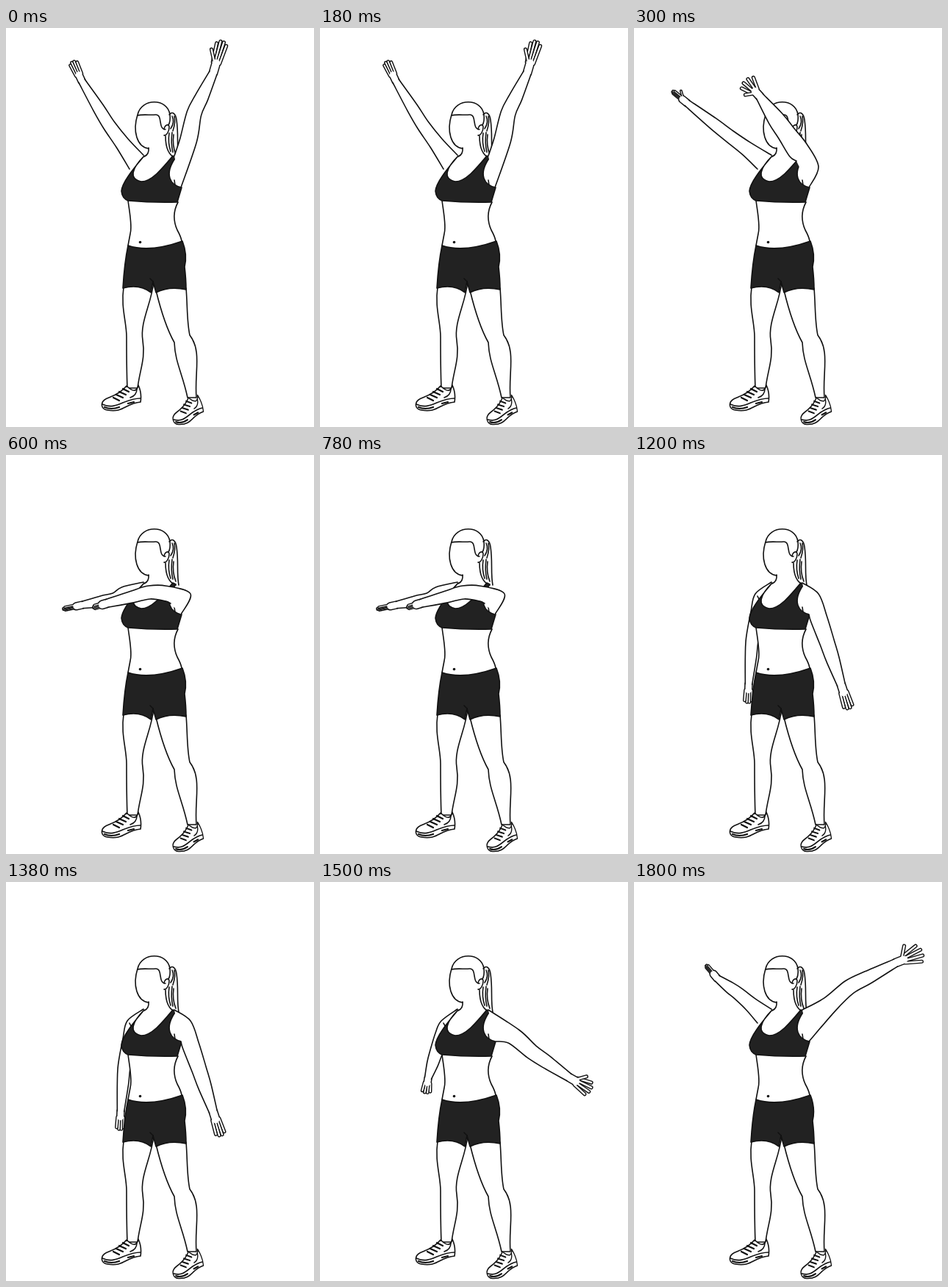
An HTML page for the animation above (2.1 s loop, 419 by 543 pixels).

```html
<!DOCTYPE html>
<html lang="en">
<head>
<meta charset="utf-8">
<title>Arm circles</title>
<style>
html, body { margin: 0; width: 100%; height: 100%; overflow: hidden; background: #fff; }
svg { display: block; width: 419px; height: 543px; }
path { fill: none; stroke: #111; stroke-width: 1.6; stroke-linecap: round; stroke-linejoin: round; }
.skin { fill: #fff; }
.bare { fill: #fff; stroke: none; }
.cloth { fill: #222; }
.bold { stroke-width: 2.2; }
.pose { visibility: hidden; animation: show 2100ms step-end calc(var(--i) * 300ms - 2100ms) infinite; }
@keyframes show {
  0% { visibility: visible; }
  14.28571%, 100% { visibility: hidden; }
}
</style>
</head>
<body>
<svg viewBox="0 0 419 543">
  <defs>
    <g id="shoe">
      <path class="skin" d="M164 487Q156 497 140 503C126 508 129 519 138 520C160 524 162 511 183 509Q185 497 180 486Q177 500 164 487Z"/>
      <path d="M131 512C150 521 160 504 183 504M169 503Q178 500 178 491"/>
      <path class="bold" d="M134 516Q143 520 154 516M166 511l8 -2"/>
      <path class="bold" d="M159 491l8 4m-13 0l9 4m-13 0l9 4m-13 0l8 4"/>
    </g>
  </defs>

  <g id="far"></g>

  <g id="body">
    <path class="bare" d="M194 160L188 176 166 235C168 250 172 270 169 280L166 296 239 290C238 280 222 266 234 237L239 217 231 177 216 147Z"/>
    <path d="M194 163Q195 172 188 175M217 147Q217 172 231 177M229 207l1 7"/>
    <path d="M166 235C168 250 172 270 169 280L166 296M234 237C226 252 229 266 233 275Q238 284 239 290"/>
    <circle cx="182.500" cy="291.500" r="1.800" fill="#111"/>

    <path class="skin" d="M160 353C156 380 164 400 164 420S164 465 165 490H179C182 465 190 450 186 425S198 375 201 345"/>
    <path class="skin" d="M204 357C212 390 220 412 229 428C230 455 240 470 247 503H259C256 470 267 440 250 418C246 400 247 380 245 354"/>
    <path class="cloth" d="M166 296Q195 306 240 290Q247 308 243 325Q245 342 245 356Q222 351 204 360L200 345 197 360Q182 348 159 354Q161 320 166 296Z"/>
    <path d="M196 341l4 4"/>
    <path class="cloth" d="M188 174C180 184 158 208 157 222Q158 232 166 235Q200 238 233 237L239 217C224 214 214 200 231 176L227 174C212 192 198 209 184 209C166 205 172 190 188 174Z"/>
    <use href="#shoe"/>
    <use href="#shoe" transform="matrix(.8 -.15 .24 .985 0 48)"/>

    <!-- head and ponytail -->
    <path d="M194 164C178 162 172 140 179 118C184 95 220 95 223 118Q224 127 221 132"/>
    <path d="M179 119C186 117 198 119 203 118C214 117 206 138 217 138M215 138C216 131 222 130 222 135C222 141 218 147 215 146"/>
    <path d="M222 118C227 112 231 118 232 125C235 145 232 160 235 177M222 143Q220 156 224 168"/>
    <path d="M226 120Q230 128 224 137M229 120Q231 128 227 140M231 172Q226 160 228 145M227 169Q224 157 226 142"/>
  </g>

  <g id="near"></g>
</svg>
<script>
// Each arm runs from edge point(s) at the body, out to the hand and back.
const nearArm = {
  shoulder: [240, 190], size: 1,
  neck: [229, 174], cap: [251, 189], pit: [238, 217], chest: [224, 202], strap: [221, 181],
};
const farArm = {
  shoulder: [176, 181], size: 0.85,
  neck: [187, 173], cap: [165, 189], pit: [168, 192],
};
// open: angle between fingers, 0 for a hand seen edge-on; thumb: its angle; wide: foreshortening
const nearPoses = [
  { elbow: [256, 116], wrist: [282, 61], tip: [295, 16], open: 0.05, thumb: 0.5 },
  { elbow: [207, 143], wrist: [171, 93], tip: [150, 70], open: 0.25, thumb: 1, wide: 1.25, from: ['strap'], to: ['cap', 'pit'] },
  { elbow: [195, 187], wrist: [137, 202], tip: [117, 208], wide: 0.9, from: ['chest'], to: ['cap', 'pit'] },
  { elbow: [224, 248], wrist: [208, 314], tip: [202, 356], open: 0.04, wide: 1.25, from: ['neck', 'cap'], to: ['chest'] },
  { elbow: [263, 256], wrist: [282, 313], tip: [293, 347], open: 0.04, from: ['neck', 'cap'] },
  { elbow: [288, 231], wrist: [339, 266], tip: [370, 284], open: 0.15, thumb: 0.8 },
  { elbow: [293, 143], wrist: [356, 110], tip: [394, 95], open: 0.2, thumb: 1 },
];
const raised = { from: ['pit'], to: ['neck'] };
const lowered = { from: ['pit'], to: ['cap', 'neck'] };
const farPoses = [
  { ...raised, elbow: [140, 132], wrist: [103, 72], tip: [90, 44], open: 0.04 },
  { ...raised, elbow: [130, 147], wrist: [72, 102], tip: [51, 85], thumb: -0.6 },
  { ...raised, elbow: [148, 196], wrist: [104, 204], tip: [76, 210] },
  { ...lowered, elbow: [151, 247], wrist: [125, 300], tip: [119, 334], open: 0.04 },
  { ...lowered, elbow: [161, 250], wrist: [156, 312], tip: [155, 339], open: 0.03 },
  { ...lowered, elbow: [157, 235], wrist: [147, 267], tip: [144, 289], open: 0.08 },
  { ...raised, elbow: [142, 152], wrist: [113, 131], tip: [97, 112] },
];

const mix = (a, b, t) => a.map((v, k) => v + (b[k] - v) * t);
const angle = (a, b) => Math.atan2(b[1] - a[1], b[0] - a[0]);
const polar = (p, a, r) => [p[0] + r * Math.cos(a), p[1] + r * Math.sin(a)];

// Smooth curve through a few points.
function curve(p) {
  let d = '';
  for (let i = 0; i < p.length - 1; i++) {
    const a = p[i - 1] || p[i], b = p[i], c = p[i + 1], e = p[i + 2] || c;
    const out = b.map((v, k) => v + (c[k] - a[k]) / 6);
    const back = c.map((v, k) => v - (e[k] - b[k]) / 6);
    d += `C${out} ${back} ${c}`;
  }
  return d;
}

function draw(parent, d, style = '', name = '') {
  const path = document.createElementNS('http://www.w3.org/2000/svg', 'path');
  path.setAttribute('d', d);
  path.setAttribute('style', style);
  path.setAttribute('class', name);
  parent.append(path);
}
const bar = (g, a, b, colour, width) => draw(g, `M${a}L${b}`, `stroke:${colour};stroke-width:${width}`);

function drawHand(g, { wrist, tip, open = 0, thumb }, size) {
  const a = angle(wrist, tip);
  const length = Math.hypot(tip[0] - wrist[0], tip[1] - wrist[1]);
  const pitch = size * (open ? 3.2 : 1.6), skin = pitch * 0.75, ink = skin + 2.8;
  const palm = polar(wrist, a, length * 0.3), wide = size * 10;
  const finger = (from, to) => {
    bar(g, from, to, '#111', ink);
    bar(g, from, to, '#fff', skin);
  };
  bar(g, wrist, palm, '#111', wide + 3);
  for (let k = -1.5; k <= 1.5; k++) {
    const base = polar(palm, a + Math.PI / 2, k * pitch);
    finger(base, polar(base, a + k * open, length * (0.7 - 0.04 * k * k) - ink / 2));
  }
  if (thumb) {
    const base = polar(wrist, a, length * 0.2);
    finger(base, polar(base, a - thumb, length * 0.5));
  }
  bar(g, wrist, palm, '#fff', wide);
}

function drawArm(g, arm, pose) {
  const { elbow, wrist, wide = 1, from = ['neck'], to = ['pit'] } = pose;
  const { shoulder } = arm, size = arm.size * wide;
  const upper = angle(shoulder, elbow), fore = angle(elbow, wrist);
  const edge = side => [
    [mix(shoulder, elbow, 0.5), upper, 11.5 * size],
    [elbow, angle(shoulder, wrist), 10 * size],
    [mix(elbow, wrist, 0.4), fore, 9 * size],
    [wrist, fore, 5.5 * arm.size],
  ].map(([p, a, r]) => polar(p, a + side * Math.PI / 2, r));
  const first = [...from.map(k => arm[k]), ...edge(-1)];
  const second = [...edge(1).reverse(), ...to.map(k => arm[k])];
  const go = `M${first[0]}${curve(first)}`, back = `${second[0]}${curve(second)}`;
  drawHand(g, pose, arm.size);
  draw(g, `${go}L${back}Z`, '', 'bare');
  draw(g, `${go}M${back}`);
}

function addPoses(id, arm, poses) {
  poses.forEach((pose, i) => {
    const g = document.createElementNS('http://www.w3.org/2000/svg', 'g');
    g.setAttribute('class', 'pose');
    g.style.setProperty('--i', i);
    drawArm(g, arm, pose);
    document.getElementById(id).append(g);
  });
}
addPoses('far', farArm, farPoses);
addPoses('near', nearArm, nearPoses);
</script>
</body>
</html>
```
